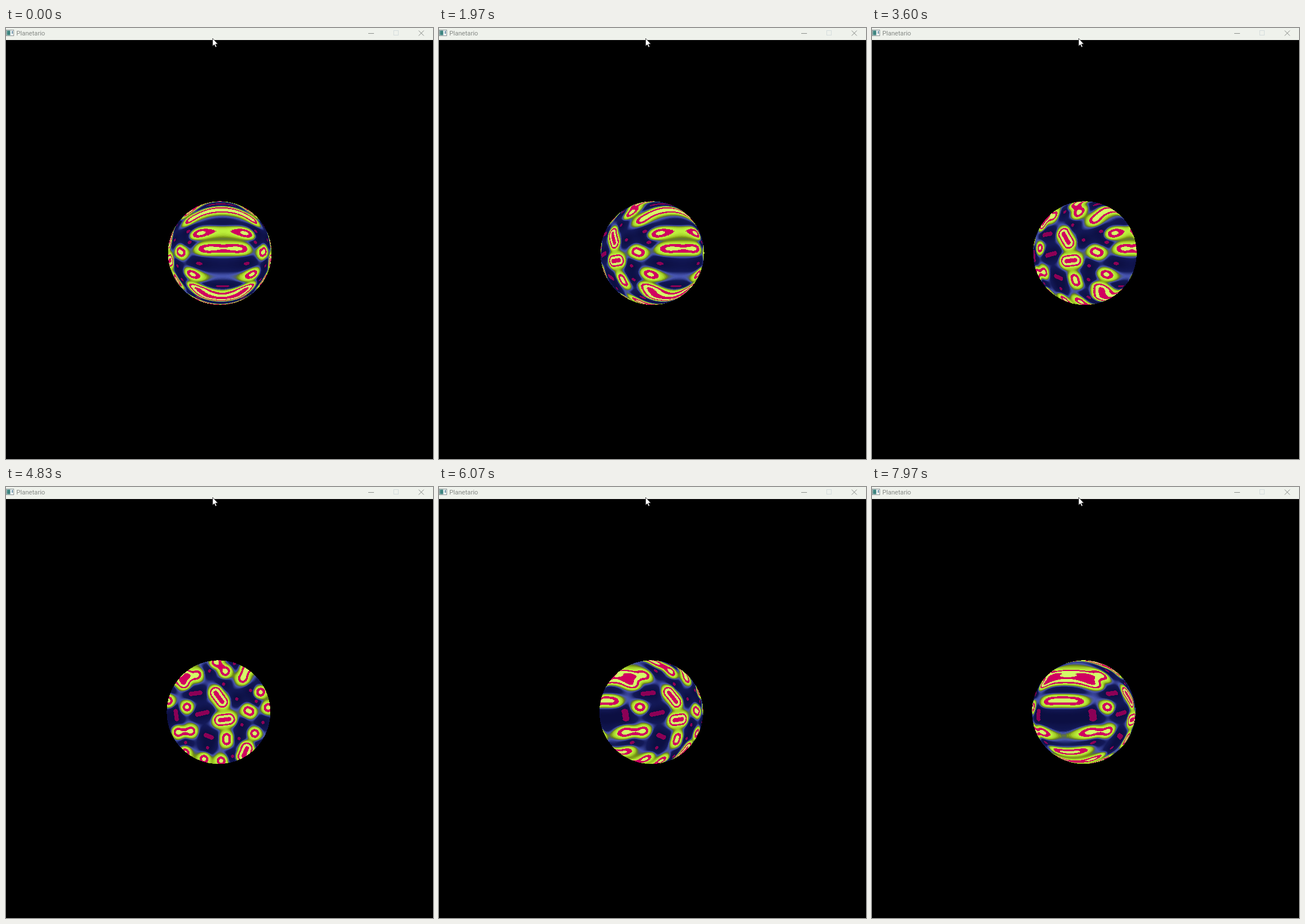
These frames come from a looping animation (745 by 752 pixels, 8 s). An HTML page with a canvas:

```html
<!DOCTYPE html>
<html lang="it">
<head>
<meta charset="utf-8">
<title>Planetario</title>
<style>
html, body { margin: 0; width: 100%; height: 100%; overflow: hidden; background: #000; }
svg { position: absolute; left: 0; top: 0; }
canvas { position: absolute; left: 272px; top: 296px; }
text { font: 11.1px Roboto, "Open Sans", sans-serif; fill: #858985; }
</style>
</head>
<body>
<svg width="745" height="752" viewBox="0 0 745 752">
  <rect width="745" height="752"/>
  <rect width="745" height="21" fill="#eff2ec"/>
  <rect x=".5" y="3.5" width="13" height="10" fill="#f8fafa" stroke="#8a9494"/>
  <rect x="1.5" y="4.5" width="6" height="8" fill="#3f8580"/>
  <rect x="10" y="5" width="2" height="5" fill="#6f93a8"/>
  <text x="18" y="13">Planetario</text>
  <path d="M632 9.5h10" stroke="#8b8f8b"/>
  <rect x="676.5" y="4.5" width="8" height="8" fill="none" stroke="#d5dddd"/>
  <path d="M720 4.5l9 9m0-9l-9 9" stroke="#858985" fill="none"/>
  <path d="M360.5 18v13.5l3-2.600 2 4.600 2-1-2-4.400h4z" fill="#fff" stroke="#222" stroke-width=".7"/>
</svg>
<canvas id="planet" width="200" height="200"></canvas>
<script>
const LOOP = 8000, STEP = 1000 / 30, R = 90.4, SIZE = 200, LEFT = 272, TOP = 296;
const CX = 370, CY = 392.8, HALF = 92, DENSE = 2, N = 2 * HALF * DENSE;

// Centres of the height field, long ones with a half axis: x, y, dx, dy
const peaks = [
  [382, 406, 8, -1], [372, 367, 6, 8], [312, 335, -2, 6], [417, 463, -3, 7],
  [424, 391, 2, 1], [385, 440, 0, 3], [316, 384], [300, 428], [323, 426],
  [333, 328], [295, 333], [383, 322], [366, 305], [413, 334], [420, 316],
  [444, 358], [457, 385], [434, 430], [375, 478], [345, 475], [312, 464], [283, 373]
];
const hollows = [
  [331, 360, 8, -1], [343, 395, 9, -2], [297, 398, 1, 7], [354, 435, 5, 2],
  [352, 455], [313, 446], [355, 321], [380, 344], [403, 370], [427, 355],
  [437, 374], [448, 411], [412, 415], [407, 439], [395, 470], [398, 308],
  [277, 404], [441, 452], [452, 336], [284, 352], [281, 432]
];
const CRIMSON = [209, 0, 96], SPOT = [140, 0, 86], PALE = [212, 252, 104];

const clamp = (v, a, b) => Math.min(b, Math.max(a, v));

// Distance from a point to the segment centred on (cx, cy)
function segDist(x, y, [cx, cy, dx = 0, dy = 0]) {
  const px = x - cx, py = y - cy;
  const k = clamp((px * dx + py * dy) / (dx * dx + dy * dy || 1), -1, 1);
  return Math.hypot(px - k * dx, py - k * dy);
}

// Long peaks are taller; close neighbours are joined by a low bridge
const hills = peaks.map(at => ({ at, h: Math.hypot(at[2] || 0, at[3] || 0) > 6 ? 1.35 : 1.03, s: 9 }));
peaks.forEach((a, i) => peaks.slice(i + 1).forEach(b => {
  if (Math.hypot(a[0] - b[0], a[1] - b[1]) < 25)
    hills.push({ at: [(a[0] + b[0]) / 2, (a[1] + b[1]) / 2], h: .68, s: 6.5 });
}));

// Colours for heights from -1 to 1
function makeRamp() {
  const c = document.createElement("canvas");
  c.width = 256;
  c.height = 1;
  const g = c.getContext("2d", { willReadFrequently: true });
  const fill = g.createLinearGradient(0, 0, 256, 0);
  const stops = { .05: "#0c0f42", .3: "#131958", .42: "#4856b2", .5: "#54645c", .55: "#708a14", .66: "#a0ca26", .85: "#bef23e" };
  for (const k in stops) fill.addColorStop(+k, stops[k]);
  g.fillStyle = fill;
  g.fillRect(0, 0, 256, 1);
  return g.getImageData(0, 0, 256, 1).data;
}
const ramp = makeRamp();

function surfaceColor(x, y) {
  let high = 0, low = 0, spot = false;
  for (const { at, h, s } of hills) {
    const d2 = segDist(x, y, at) ** 2;
    high += h * h * Math.exp(-d2 / (s * s)) + .03 * Math.exp(-d2 / 400);
  }
  for (const at of hollows) {
    const d = segDist(x, y, at);
    if (d < (at.length > 2 ? 3.8 : 2.8)) spot = true;
    low += Math.exp(-d * d / 180);
  }
  high = Math.sqrt(high);
  if (spot && high < .6) return SPOT;
  const k = clamp((high - .2) / .5, 0, 1);
  const v = high - Math.sqrt(low) * (1 - k * k * (3 - 2 * k));
  if (v > 1.26 || (v > .74 && v < .97)) return CRIMSON;
  if (v >= .97) return PALE;
  const i = Math.round(clamp((v + 1) / 2, 0, 1) * 255) * 4;
  return ramp.subarray(i, i + 3);
}

// The pattern depends on two axes only, so one flat disc colours both halves
const skin = new Uint8ClampedArray(N * N * 3);
for (let j = 0; j < N; j++) {
  for (let i = 0; i < N; i++) {
    const x = (i + .5) / DENSE - HALF, y = (j + .5) / DENSE - HALF;
    if (Math.hypot(x, y) < HALF) skin.set(surfaceColor(x + CX, y + CY), (j * N + i) * 3);
  }
}

const ctx = document.getElementById("planet").getContext("2d");
const image = ctx.createImageData(SIZE, SIZE);

function draw(ms) {
  const t = ms / 1000;
  const turn = (-86 + 16 * t + .36 * t * t) * Math.PI / 180;
  const cos = Math.cos(turn), sin = Math.sin(turn);
  const cx = 373 - .45 * t, out = image.data;
  out.fill(0);
  for (let j = 0; j < SIZE; j++) {
    const y = j + .5 + TOP - CY;
    const row = Math.floor((y + HALF) * DENSE) * N;
    for (let i = 0; i < SIZE; i++) {
      const x = i + .5 + LEFT - cx, zz = R * R - x * x - y * y;
      if (zz < 0) continue;
      const u = x * cos - Math.sqrt(zz) * sin;
      const s = (row + Math.floor((u + HALF) * DENSE)) * 3, o = (j * SIZE + i) * 4;
      for (let c = 0; c < 3; c++) out[o + c] = skin[s + c];
      out[o + 3] = 255;
    }
  }
  ctx.putImageData(image, 0, 0);
}

const start = performance.now();
function tick() {
  const ms = (performance.now() - start) % LOOP;
  draw(Math.floor(ms / STEP) * STEP);
  requestAnimationFrame(tick);
}
tick();
</script>
</body>
</html>
```
